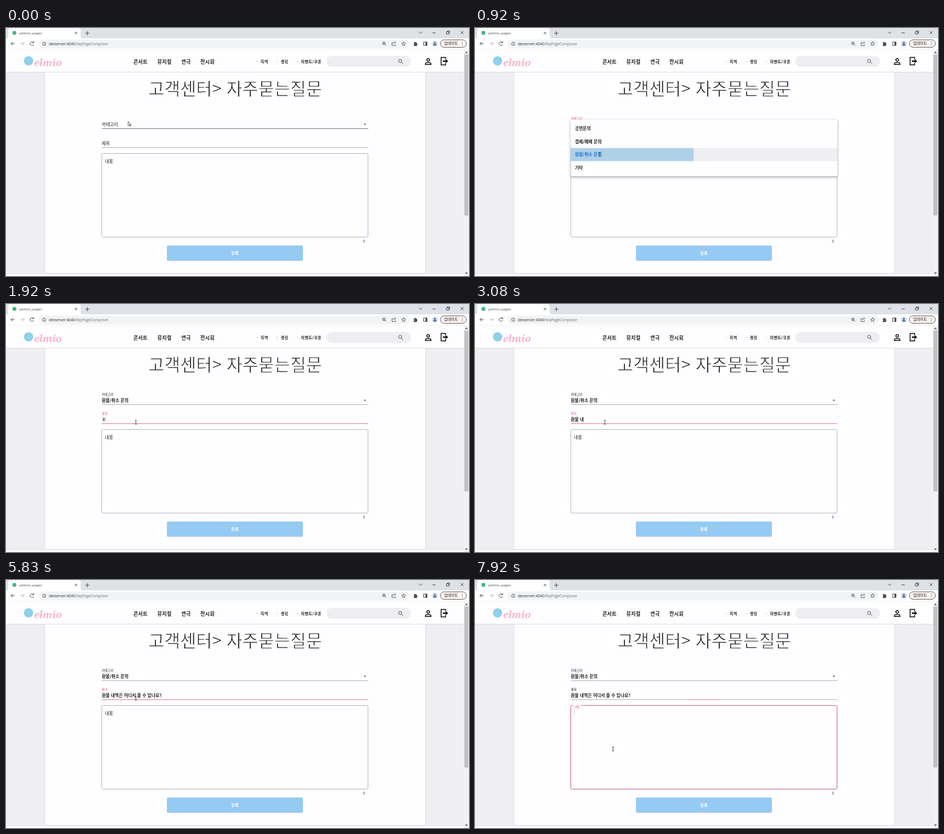
An HTML page for the animation above (8 s loop, 800 px wide and 430 px high).

```html
<!DOCTYPE html>
<html lang="ko">
<head>
<meta charset="utf-8">
<title>FAQ form</title>
<style>
  html, body { margin: 0; height: 100%; overflow: hidden; background: #fff; }
  svg { display: block; width: 100vw; height: 100vh; }
  text { font-family: "Noto Sans CJK KR", "Noto Sans CJK", sans-serif; fill: #222; white-space: pre; }
  .latin { font-family: "Open Sans", sans-serif; }
  .bold { font-weight: 700; }
  .field { font-size: 7.45px; font-weight: 700; }
  .label { font-size: 7.6px; }
  .heading { font-size: 29.9px; fill: #1c1c1e; stroke: #fefdff; stroke-width: .8px; }
  .nav { font-size: 8.6px; font-weight: 700; letter-spacing: .4px; fill: #111; }
  .sub { font-size: 6.6px; font-weight: 700; letter-spacing: .4px; fill: #111; }
  .icon { fill: none; stroke: #4a4d51; stroke-width: 1; }
  .strong { fill: none; stroke: #111; stroke-width: 1.5; }
  .focus { stroke: #e27a9a; stroke-width: 1; }
</style>
</head>
<body>
<svg viewBox="0 0 800 430" preserveAspectRatio="none">
  <defs>
    <filter id="soft" x="-10%" y="-20%" width="120%" height="150%">
      <feDropShadow dx="0" dy="1.5" stdDeviation="2" flood-opacity=".38"/>
    </filter>
    <filter id="low" x="-5%" y="-20%" width="110%" height="150%">
      <feDropShadow dx="0" dy=".6" stdDeviation=".6" flood-opacity=".22"/>
    </filter>
    <clipPath id="row"><rect x="165" y="208.3" width="461" height="22.5"/></clipPath>
  </defs>

  <!-- browser window -->
  <rect width="800" height="18" fill="#dee1e6"/>
  <path d="M1 18q3 0 3-3V4q0-4 4-4H125q4 0 4 4V15q0 3 3 3z" fill="#fff"/>
  <circle cx="14.5" cy="8.5" r="3.4" fill="#41b883"/>
  <text class="latin" x="23" y="11" font-size="6.1" style="fill:#45484c">pelmio_pages</text>
  <g class="icon">
    <path d="M119 6.7l4 4m0-4l-4 4M137 9h7m-3.5-3.5v7"/>
    <path d="M713.5 6.5l3 3 3-3M737 8.5h5.5M761 6.5h4v4h-4zM762.5 6.5V5h4v4H765M785.5 5.5l5 5m0-5l-5 5"/>
  </g>
  <rect y="18" width="800" height="19" fill="#fff"/>
  <rect x="56" y="20" width="641" height="15" rx="7.5" fill="#f1f3f4"/>
  <g class="icon">
    <path d="M15 27H8.5m3-3l-3 3 3 3"/>
    <path d="M25 27h6.5m-3-3l3 3-3 3" stroke="#b4b7ba"/>
    <path d="M47.3 25a3.2 3.2 0 1 0 .6 3M48 23v2.5h-2.5"/>
    <circle cx="66" cy="27.3" r="2.9" stroke-width=".8"/><path d="M66 27v2m0-3.5v.8" stroke-width=".8"/>
    <circle cx="653" cy="26.5" r="2.3"/><path d="M654.7 28.2l2.3 2.3M652 26.5h2" stroke-width=".9"/>
    <path d="M669 25h-2v5.5h6v-2M669 28q.3-3 4-3m-1.5-1.7l1.9 1.7-1.9 1.7" stroke-width=".8"/>
    <path d="M687 23.7l1 2.3 2.5.2-1.9 1.6.6 2.5-2.2-1.3-2.2 1.3.6-2.5-1.9-1.6 2.5-.2z" stroke-width=".8"/>
    <path d="M721.5 24.2h6v6h-6z"/><path d="M726 24v6.5" stroke-width="2.6"/>
  </g>
  <path d="M704.5 25.2h1.6a1.1 1.1 0 0 1 2.2 0h1.7v1.8a1.1 1.1 0 0 1 0 2.2v2h-5.5v-2a1.1 1.1 0 0 0 0-2.2z" fill="#4a4d51"/>
  <circle cx="741" cy="27" r="5" fill="#cfdcec"/>
  <path d="M738 30.3q0-2.3 3-2.3t3 2.3z" fill="#385a8a"/><circle cx="741" cy="25.8" r="1.6" fill="#385a8a"/>
  <rect x="750.5" y="20.5" width="45" height="13" rx="6.5" fill="#f9f2f0" stroke="#5c5153" stroke-width=".9"/>
  <text x="757" y="29.3" font-size="6.5">업데이트</text>
  <g fill="#8a5a4a"><circle cx="788.5" cy="24.5" r=".7"/><circle cx="788.5" cy="27" r=".7"/><circle cx="788.5" cy="29.5" r=".7"/></g>
  <text class="latin" x="74" y="29.6" font-size="6.4" style="fill:#2b2d30">devserver:4040<tspan fill="#6d7074">/faqPageComposer</tspan></text>
  <path d="M0 37.3H800" stroke="#e3e3e6" stroke-width=".7"/>

  <!-- page -->
  <rect y="76" width="791" height="350" fill="#efeef0"/>
  <rect x="67" y="70" width="658" height="355.5" rx="2" fill="#fefdff" stroke="#d9d8db" stroke-width=".8"/>
  <rect y="37.7" width="791" height="38.5" fill="#fefdff"/>
  <path d="M0 76.5H791M0 426H791" stroke="#d6d5d8" stroke-width=".8"/>
  <circle cx="39" cy="57" r="8" fill="#8fd0ea"/>
  <text x="48.5" y="66" font-size="17" font-weight="700" font-style="italic" style="font-family:'Noto Serif',serif;fill:#f8b3cb">elmio</text>
  <g class="nav">
    <text x="220" y="61.6">콘서트</text><text x="261.5" y="61.6">뮤지컬</text>
    <text x="303" y="61.6">연극</text><text x="335.7" y="61.6">전시회</text>
  </g>
  <g class="sub">
    <text x="440" y="60.8">지역</text><text x="475" y="60.8">랭킹</text><text x="509.8" y="60.8">이벤트/쿠폰</text>
  </g>
  <g fill="#9aa8b8"><circle cx="434" cy="58" r=".8"/><circle cx="468.5" cy="58" r=".8"/><circle cx="503.5" cy="58" r=".8"/></g>
  <rect x="553.5" y="48.5" width="146" height="19" rx="9.5" fill="#eeedef"/>
  <g class="icon" style="stroke:#5e5f62"><circle cx="681" cy="57" r="2.7"/><path d="M683 59l3.3 3.3"/></g>
  <circle class="strong" cx="729.5" cy="55.3" r="2.3"/>
  <path class="strong" d="M724.7 63.3v-1.3q0-2.2 4.8-2.2t4.8 2.2v1.3z"/>
  <path class="strong" d="M759.5 54V51h-7.7v13h7.7v-3"/>
  <path d="M755 56.3h4.7v-2.6l4.3 3.8-4.3 3.8v-2.6H755z" fill="#111"/>

  <rect x="791" y="37.7" width="9" height="393" fill="#f1f1f1"/>
  <rect x="792" y="46" width="7" height="279" fill="#c1c1c1"/>
  <path d="M793 43.5h5l-2.5-2.7zM793 424h5l-2.5 2.7z" fill="#555"/>

  <text class="heading" x="246" y="116.4">고객센터&gt; 자주묻는질문</text>

  <!-- form -->
  <path id="selectLine" d="M165.5 174.5H626"/>
  <path id="selectFocus" class="focus"/>
  <path d="M617.8 166h4.6l-2.3 2.4z" fill="#666"/>
  <text id="selectLabel" class="label">카테고리</text>
  <text id="selected" class="field" x="165.5" y="170">환불/취소 문의</text>

  <path d="M165.5 207.5H626" stroke="#b3b2b5"/>
  <path id="titleFocus" class="focus"/>
  <text id="titleLabel" class="label">제목</text>
  <text id="typed" class="field" x="165.5" y="202.7"></text>

  <rect id="area" x="165.5" y="217.5" width="460" height="145" rx="2" fill="none"/>
  <rect id="notch" x="169.5" y="216" width="14" height="4" fill="#fefdff"/>
  <text id="areaLabel" class="label">내용</text>
  <text x="617" y="372.4" font-size="5.5">0</text>
  <path id="caret" stroke="#aaa" stroke-width=".6"/>

  <rect x="278" y="377.3" width="235" height="26" rx="2" fill="#95caf3" filter="url(#low)"/>
  <text class="bold" x="395.5" y="393" font-size="7.2" text-anchor="middle" style="fill:#fff">등록</text>

  <g id="menu">
    <rect x="165.5" y="159" width="460.5" height="98" rx="2" fill="#fefdff" filter="url(#soft)"/>
    <rect id="hover" x="165.5" width="460.5" height="22.5" fill="#efeef0"/>
    <circle id="ripple" cx="215" cy="219" fill="#4ba3dc" fill-opacity=".4" clip-path="url(#row)"/>
    <g class="field">
      <text x="172.7" y="177">공연문의</text><text x="172.7" y="199.6">결제/예매 문의</text>
      <text id="choice" x="172.7" y="222.1">환불/취소 문의</text><text x="172.7" y="244.7">기타</text>
    </g>
  </g>

  <path id="arrow" d="M0 0v7.5l1.8-1.6 1.2 2.7 1.2-.6-1.2-2.5h2.4z" fill="#fff" stroke="#222" stroke-width=".7"/>
  <path id="beam" d="M-1.5-3.3H1.5M0-3.3V3.3M-1.5 3.3H1.5" stroke="#333" stroke-width=".8"/>
</svg>
<script>
const LOOP = 8000;
const OPEN = 300, PICK = 830, CLOSE = 1000, TITLE = 1580, AREA = 7725;
const PINK = "#e4608c", INK = "#222";
const $ = id => document.getElementById(id);
const set = (id, attrs) => Object.entries(attrs).forEach(([k, v]) => $(id).setAttribute(k, v));
const show = (id, on) => set(id, { visibility: on ? "visible" : "hidden" });
const mix = (a, b, p) => a + (b - a) * p;
const ramp = (t, start, length) => {
  const p = Math.min(1, Math.max(0, (t - start) / length));
  return p * p * (3 - 2 * p);
};

// Composition steps of each typed word, one per key press.
const words = [
  "ㅎ 호 화 환 환ㅂ 환부 환불",
  "ㄴ 내 냉 내여 내역 내역ㅇ 내역으 내역은",
  "ㅇ 어 얻 어디 어딧 어디서",
  "ㅂ 보 볼",
  "ㅅ 수",
  "ㅇ 이 있 있ㄴ 있나 있낭 있나요 있나요?"
];
const steps = [""];
let done = "";
for (const word of words) {
  const stages = word.split(" ");
  steps.push(...stages.map(s => done + s));
  done += stages.at(-1) + " ";
  if (word !== words.at(-1)) steps.push(done);
}
// Two bursts of typing with a pause between them.
const keyTime = k => k <= 10 ? 1880 + (k - 1) * 75 : 3150 + (k - 11) * 86;

// Mouse path: time, x, y
const path = [[0, 211, 162], [380, 211, 162], [760, 215, 219], [1060, 215, 219],
  [1480, 224.4, 205], [7400, 224.4, 205], [7700, 238.5, 293], [LOOP, 238.5, 293]];
function mouse(t) {
  const i = Math.max(1, path.findIndex(p => p[0] > t));
  const [a, b] = [path[i - 1], path[i]];
  const p = ramp(t, a[0], b[0] - a[0]);
  return [mix(a[1], b[1], p), mix(a[2], b[2], p)];
}

function label(id, x, low, high, p, focused) {
  set(id, { transform: `translate(${x} ${mix(low, high, p)}) scale(${mix(1, .72, p)})` });
  $(id).style.fill = focused ? PINK : INK;
}
function focusLine(id, y, p) {
  set(id, { d: `M${395.7 - 230.3 * p} ${y}H${395.7 + 230.3 * p}` });
  show(id, p > 0);
}

function draw(t) {
  const [x, y] = mouse(t);
  const overText = t > 600;
  set("arrow", { transform: `translate(${x} ${y})` });
  set("beam", { transform: `translate(${x} ${y})` });
  show("arrow", !overText);
  show("beam", overText);

  const selectFocused = t >= OPEN && t < TITLE;
  label("selectLabel", 165.5, 169.8, 159, ramp(t, OPEN, 200), selectFocused);
  set("selectLine", { stroke: t < TITLE ? "#77767a" : "#b3b2b5" });
  focusLine("selectFocus", 174.5, ramp(t, OPEN, 300) * (1 - ramp(t, TITLE, 250)));
  show("selected", t >= PICK + 60);

  const opened = ramp(t, OPEN, 200) * (1 - ramp(t, CLOSE, 200));
  set("menu", { opacity: opened });
  const row = Math.min(3, Math.max(0, Math.floor((y - 163.3) / 22.5)));
  set("hover", { y: 163.3 + row * 22.5 });
  set("ripple", { r: t < PICK ? 0 : Math.min(420, (t - PICK) * 1.79) });
  $("choice").style.fill = t >= PICK ? "#1976d2" : INK;

  const titleFocused = t >= TITLE && t < AREA;
  label("titleLabel", 165.5, 202.8, 192, ramp(t, TITLE, 200), titleFocused);
  focusLine("titleFocus", 207.5, ramp(t, TITLE, 300) * (1 - ramp(t, AREA, 250)));

  let key = 0;
  while (key < steps.length - 1 && keyTime(key + 1) <= t) key++;
  $("typed").textContent = steps[key];

  const areaFocused = t >= AREA;
  const raised = ramp(t, AREA, 150);
  label("areaLabel", 171, 234, 222, raised, areaFocused);
  set("area", { stroke: areaFocused ? "#c0607e" : "#b7b6b9" });
  show("notch", raised > .5);

  const since = t - (areaFocused ? AREA : key ? keyTime(key) : TITLE);
  show("caret", t >= TITLE && since % 1000 < 500);
  const caretX = areaFocused ? 171.5 : 166 + (key ? $("typed").getComputedTextLength() : 0);
  set("caret", { d: areaFocused ? `M${caretX} 224v10` : `M${caretX} 195.5v9` });
}

function frame(now) {
  draw(now % LOOP);
  requestAnimationFrame(frame);
}
draw(0);
requestAnimationFrame(frame);
</script>
</body>
</html>
```
